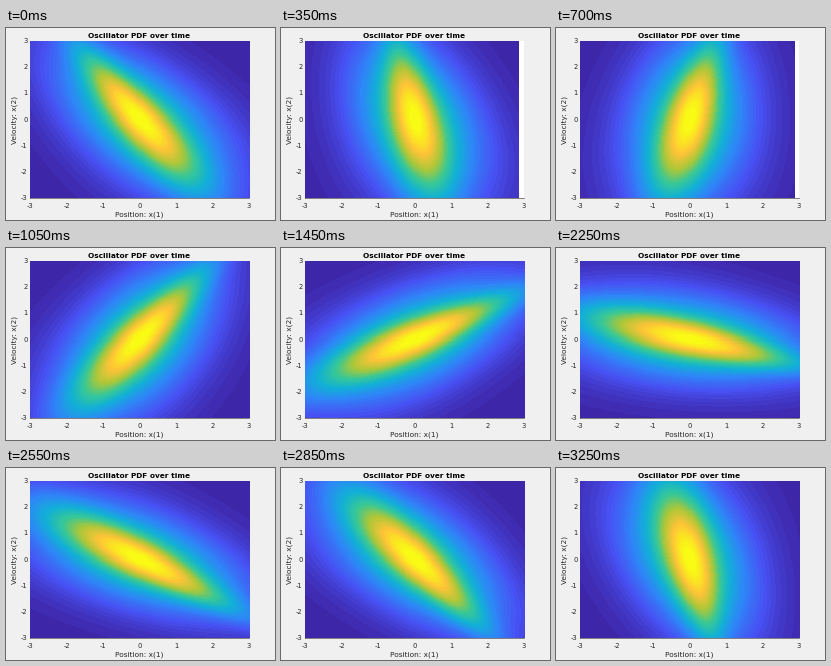
A matplotlib script that plays this animation: 269 by 192 pixels, repeating every 3.3 s.

```python
import numpy as np
import matplotlib.pyplot as plt
from matplotlib.animation import FuncAnimation
from matplotlib.colors import LinearSegmentedColormap

W, H, DPI = 269, 192, 100
LEFT, RIGHT, TOP, BOTTOM = 24, 243, 13, 170
FRAMES, TICK = 66, 50
LEVELS = 50
INK = "#262626"
START, TURN = np.radians(121), np.radians(.0617)  # phase, and turn per ms
PAUSE = range(24, 29)

PARULA = LinearSegmentedColormap.from_list("parula", [
    "#3e26a8", "#4852f4", "#2e87f7", "#12b1d6",
    "#37c897", "#abc739", "#fec338", "#f9fb15"])


def centers(start, stop, count):
    return start + (stop - start) * (np.arange(count) + .5) / count


x, y = np.meshgrid(centers(-3, 3, RIGHT - LEFT), centers(3, -3, BOTTOM - TOP))


def gaussian(angle, length, width, taper=0):
    """Elongated bump along an angle, narrowing towards its tip."""
    along = x * np.cos(angle) + y * np.sin(angle)
    across = y * np.cos(angle) - x * np.sin(angle)
    width = width * np.exp(-taper * along)
    return np.exp(-.5 * ((along / length) ** 2 + (across / width) ** 2))


def density(t):
    """A narrow core inside a wide, slightly twisted halo, turning steadily."""
    angle = START - TURN * t
    z = (.45 * gaussian(angle, 2.4, .46, .08)
         + .55 * gaussian(angle + .1, 2.35, 1.2, .03))
    z = np.floor(z * LEVELS) / LEVELS
    # The sampled region turns too and can end short of the right edge.
    reach = np.hypot(5 * np.cos(angle), 3 * np.sin(angle)) - .25 * np.sin(angle)
    z[x > reach] = np.nan
    return z


plt.rcParams["font.family"] = "DejaVu Sans"
fig = plt.figure(figsize=((W + .01) / DPI, (H + .01) / DPI), dpi=DPI,
                 facecolor="#f0f0f0")
ax = fig.add_axes([LEFT / W, 1 - BOTTOM / H, (RIGHT - LEFT) / W,
                   (BOTTOM - TOP) / H])
image = ax.imshow(density(0), cmap=PARULA, vmin=0, vmax=1 - 1 / LEVELS,
                  extent=(-3, 3, -3, 3), aspect="auto",
                  interpolation="nearest", zorder=5)
ax.set(xticks=[], yticks=[])
for side, spine in ax.spines.items():
    spine.set(visible=side in ("left", "bottom"), color=INK, linewidth=.4)


def label(px, py, text, size=7.4, **style):
    style = {"ha": "center", "va": "center", "color": INK, **style}
    fig.text(px / W, 1 - py / H, text, fontsize=size * 72 / DPI, **style)


mid_x, mid_y = (LEFT + RIGHT) / 2, (TOP + BOTTOM) / 2
for n in range(-3, 4):
    label(mid_x + n * (RIGHT - LEFT) / 6, 177.5, str(n), 6.8)
    label(21.5, mid_y - n * (BOTTOM - TOP) / 6, str(n), 6.8, ha="right")
label(mid_x - .5, 9.5, "Oscillator PDF over time", weight="bold",
      color="black", va="baseline")
label(mid_x, 187, "Position: x(1)")
label(8.5, mid_y, "Velocity: x(2)", rotation=90)


def update(frame):
    # One long pause, then every third tick repeats the one before.
    if frame in PAUSE:
        frame = PAUSE.start
    elif frame > PAUSE.stop and frame % 3 == 1:
        frame -= 1
    image.set_data(density(frame * TICK))
    return [image]


anim = FuncAnimation(fig, update, frames=FRAMES, interval=TICK,
                     repeat=True, repeat_delay=0)
plt.show()
```
